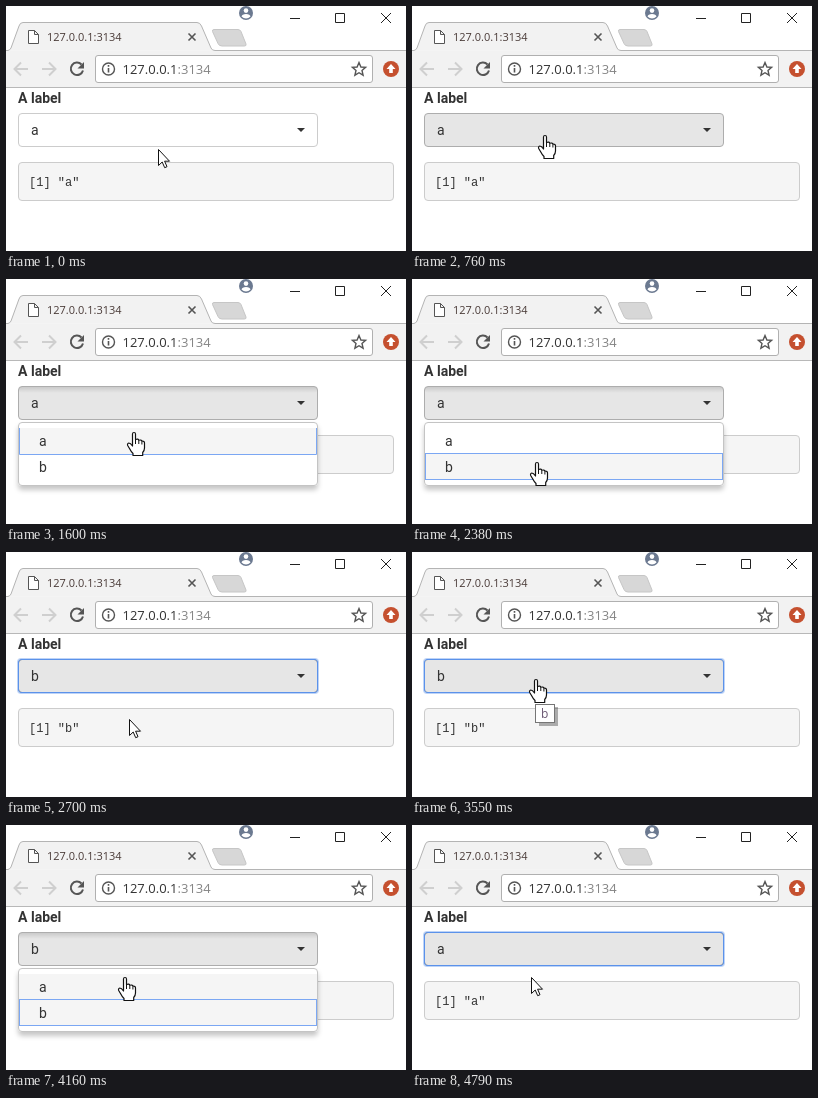
An HTML page for the animation above (5.49 s loop, 400 by 245 pixels).

```html
<!DOCTYPE html>
<html lang="en">
<head>
<meta charset="utf-8">
<title>Select input</title>
<style>
html, body { margin: 0; width: 100%; height: 100%; overflow: hidden; background: #fff; }
svg { display: block; width: 400px; height: 245px; }
text { font-family: "Open Sans", "Noto Sans", sans-serif; fill: #333; white-space: pre; }
.page { font-family: Roboto, "Liberation Sans", sans-serif; font-size: 14px; }
.mono { font-family: "Liberation Mono", "DejaVu Sans Mono", monospace; font-size: 12px; }
.line { fill: none; stroke: #555; }
</style>
</head>
<body>
<svg viewBox="0 0 400 245">
  <defs>
    <filter id="drop" x="-10%" y="-20%" width="120%" height="150%">
      <feDropShadow dx="0" dy="4" stdDeviation="2.5" flood-color="#000" flood-opacity=".22"/>
    </filter>
    <linearGradient id="inset" x2="0" y2="1">
      <stop offset="0" stop-opacity=".12"/>
      <stop offset="1" stop-opacity="0"/>
    </linearGradient>
  </defs>
  <rect width="400" height="245" fill="#fff"/>

  <!-- browser window -->
  <path d="M0 44.5H400V81H0Z" fill="#f2f2f2"/>
  <path d="M0 44.5H2Q4 44 5 42L13 20Q14 16.500 17 16.500H191Q194 16.500 195.500 20L205 42Q206 44.500 209 44.500H400" fill="#f2f2f2" stroke="#b4b4b4"/>
  <path d="M0 81.500H400" stroke="#b8b8b8"/>
  <path d="M208 23.500H232Q234 23.500 235 25.500L240 38Q240.500 40 238.500 40H216Q213 40 212 37.500L206.500 25.500Q206 23.500 208 23.500Z" fill="#d7d7d7" stroke="#c6c6c6"/>
  <circle cx="240" cy="7" r="7" fill="#6b7990"/>
  <circle cx="240" cy="4.600" r="2.300" fill="#fff"/>
  <path d="M235.500 10.500Q236 8 240 8T244.500 10.500Q242.500 12.500 240 12.500T235.500 10.500Z" fill="#fff"/>
  <path class="line" style="stroke:#222" d="M284 12.500H294M329.500 7.500H338.500V16.500H329.500ZM375 7L385 17M385 7L375 17"/>
  <path d="M22.500 24.500H28.500L32.500 28.500V37.500H22.500ZM28.500 24.500V28.500H32.500" fill="#fff" stroke="#555"/>
  <text x="41" y="35" font-size="11" style="fill:#493a37">127.0.0.1:3134</text>
  <path class="line" stroke-width="1.600" d="M182.500 27.500L189.500 34.500M189.500 27.500L182.500 34.500"/>
  <path class="line" style="stroke:#cfcfcf" stroke-width="2" d="M22 63H9M15 56.500L8.500 63L15 69.500M36 63H49M43 56.500L49.500 63L43 69.500"/>
  <path class="line" stroke-width="2" d="M75.500 58.500A6.200 6.200 0 1 0 77 64.500"/>
  <path d="M78 56V62.500H71.500Z" fill="#555"/>
  <rect x="89.500" y="49.500" width="277" height="27" rx="2.500" fill="#fff" stroke="#b0b0b0"/>
  <circle class="line" cx="102.500" cy="63" r="6" stroke-width="1.400"/>
  <path class="line" stroke-width="1.600" d="M102.500 62V66.500M102.500 59V60.700"/>
  <text x="116.500" y="68" font-size="13">127.0.0.1<tspan fill="#858585">:3134</tspan></text>
  <path class="line" stroke-width="1.400" d="M353 56.500L354.900 61L359.600 61.400L356 64.500L357.100 69.200L353 66.700L348.900 69.200L350 64.500L346.400 61.400L351.100 61Z"/>
  <circle cx="385" cy="63" r="8" fill="#c5502f"/>
  <path d="M385 58L389.500 63H386.800V67H383.200V63H380.500Z" fill="#fff"/>

  <!-- page -->
  <text class="page" x="12" y="97" font-weight="700">A label</text>
  <rect x="12.500" y="156.500" width="375" height="38" rx="3.500" fill="#f5f5f5" stroke="#ccc"/>
  <text class="mono" id="output" x="23" y="180"></text>
  <rect id="button" x="12.500" y="107.500" width="299" height="33" rx="3.500"/>
  <rect id="inner" x="13" y="108" width="298" height="6" rx="3" fill="url(#inset)"/>
  <g id="ring" fill="none" stroke="#5b92ea">
    <rect x="11.500" y="106.500" width="301" height="35" rx="3" opacity=".4"/>
    <rect x="12.500" y="107.500" width="299" height="33" rx="2.500"/>
  </g>
  <text class="page" id="value" x="25" y="129"></text>
  <path d="M291 122H299L295 126Z" fill="#333"/>

  <g id="menu">
    <rect x="12.500" y="143.500" width="299" height="63" rx="3.500" fill="#fff" stroke="#c4c4c4" filter="url(#drop)"/>
    <rect id="rowA" x="13" y="149" width="298" height="26" fill="#f5f5f5"/>
    <rect id="rowB" x="13" y="175" width="298" height="26" fill="#f5f5f5"/>
    <path id="focusA" d="M13.500 149V175.500H310.500V149" fill="none" stroke="#7ba7f3"/>
    <rect id="focusB" x="13.500" y="174.500" width="297" height="26" fill="none" stroke="#7ba7f3"/>
    <text class="page" x="33" y="167">a</text>
    <text class="page" x="33" y="193">b</text>
  </g>

  <g id="tip">
    <path d="M127 155H146V174H127Z" fill="#000" opacity=".3"/>
    <rect x="123.500" y="152.500" width="19" height="18" fill="#fff" stroke="#767676"/>
    <text x="129" y="166" font-size="12" style="fill:#6b5873">b</text>
  </g>

  <g stroke="#111" fill="#fff" stroke-linejoin="round">
    <path id="arrow" d="M.500 .500V16.500L4.200 13L6.700 18.700L9 17.700L6.600 12.200H11.500Z"/>
    <g id="hand">
      <path d="M-1.500 14V2Q-1.500 .500 0 .500T1.500 2V7.500Q4.300 6.300 4.800 8.300Q7.300 7.400 7.900 9.200Q10.500 8.700 10.500 11V16Q10.500 18.500 8.700 20.500V23.500H-1V21.500Q-3 19.500 -4.500 16.500L-6.300 13.500Q-7 11.500 -5.200 11Q-3.500 11 -1.500 14Z" stroke-width="1.200"/>
      <path d="M1.500 7.500V12M4.800 8.500V12M7.900 9.500V12.500" fill="none"/>
    </g>
  </g>
</svg>
<script>
const LOOP = 5490;
const el = id => document.getElementById(id);
const show = (id, on) => el(id).setAttribute("visibility", on ? "visible" : "hidden");

// pointer hot spot: [time, x, y]
const pointer = [
  [0, 152, 143], [440, 147, 139], [520, 142, 135], [600, 137, 132], [680, 134, 130], [760, 133, 129],
  [1600, 128, 153], [1680, 127, 165], [1750, 126, 177], [1830, 125, 183],
  [2700, 123, 167], [2780, 123, 153], [2860, 123, 140], [2930, 124, 133], [3010, 124, 129], [3090, 124, 127],
  [3930, 123, 132], [4010, 121, 140], [4090, 120, 148], [4160, 119, 152]
];

const looks = {
  rest: ["#fff", "#ccc"],
  hover: ["#e6e6e6", "#adadad"],
  focus: ["#e6e6e6", "#8c8c8c"],
  press: ["#d4d4d4", "#8c8c8c"]
};

function draw(t) {
  const within = (from, to) => t >= from && t < to;
  const [, x, y] = pointer.findLast(p => p[0] <= t);
  const firstOpen = within(1140, 2460);
  const open = firstOpen || within(3780, 4710);
  const pressed = within(990, 1140) || within(3630, 3780);
  const over = y < 142;
  const focused = !open && t >= 990;
  const choice = within(2460, 4710) ? "b" : "a";
  const printed = within(2550, 4790) ? "b" : "a";

  const look = pressed || (open && over) ? "press"
    : open || over ? "hover"
    : focused ? "focus" : "rest";
  el("button").setAttribute("fill", looks[look][0]);
  el("button").setAttribute("stroke", looks[look][1]);
  show("inner", open || pressed);
  show("ring", focused);
  el("value").textContent = choice;
  el("output").textContent = `[1] "${printed}"`;

  const focusB = choice === "b" || t >= 2380;
  const overA = y >= 149 && y < 175;
  show("menu", open);
  show("rowA", open && (overA || !focusB));
  show("rowB", open && (y >= 175 || focusB));
  show("focusA", open && !focusB);
  show("focusB", open && focusB);
  show("tip", within(3470, 3630));
  el("tip").setAttribute("opacity", t < 3550 ? .5 : 1);

  const hand = over || (open && y >= 149);
  show("hand", hand);
  show("arrow", !hand);
  for (const id of ["hand", "arrow"]) el(id).setAttribute("transform", `translate(${x} ${y})`);
}

const start = performance.now();
function tick() {
  draw((performance.now() - start) % LOOP);
  requestAnimationFrame(tick);
}
draw(0);
requestAnimationFrame(tick);
</script>
</body>
</html>
```
